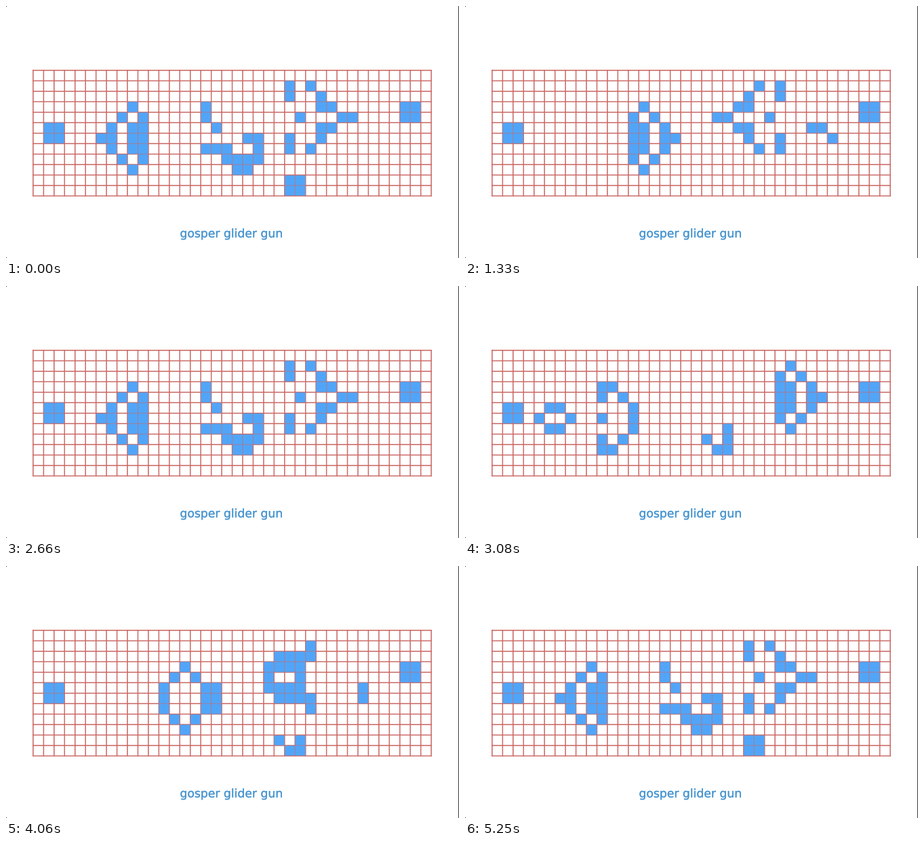
Recreate the animation shown at these times as a matplotlib script. Size 668 px wide and 372 px high, loop 5320 ms.

```python
import matplotlib.pyplot as plt
import numpy as np
from matplotlib.animation import FuncAnimation
from matplotlib.collections import LineCollection
from matplotlib.colors import ListedColormap
from matplotlib.patheffects import withStroke
from matplotlib.patches import Rectangle

W, H, DPI = 668, 372, 100
PX = 72 / DPI
COLS, ROWS = 38, 12
LEFT, TOP, CELL = 40, 95, 15.45
FRAMES, STEP_MS = 76, 70
RATE = 4 / 5  # generations per frame
WARMUP = 42   # generations before the loop begins

RED, BLUE, LABEL, EDGE = "#cb6a66", "#51a5f8", "#4b97d1", "#3c3c3c"

GUN = """
........................O...........
......................O.O...........
............OO......OO............OO
...........O...O....OO............OO
OO........O.....O...OO..............
OO........O...O.OO....O.O...........
..........O.....O.......O...........
...........O...O....................
............OO......................
""".split()


def evolve(grid):
    """One Game of Life step; everything beyond the border is dead."""
    pad = np.pad(grid, 1)
    near = sum(pad[r:r + ROWS, c:c + COLS]
               for r in range(3) for c in range(3)) - grid
    return ((near == 3) | ((near == 2) & (grid == 1))).astype(int)


def history(count):
    grid = np.zeros((ROWS, COLS), int)
    for r, line in enumerate(GUN, 1):
        for c, mark in enumerate(line, 1):
            grid[r, c] = mark == "O"
    for _ in range(WARMUP):
        grid = evolve(grid)
    states = [grid]
    while len(states) < count:
        states.append(evolve(states[-1]))
    return states


states = history(int(FRAMES * RATE) + 1)

fig = plt.figure(figsize=(W / DPI, H / DPI), dpi=DPI, facecolor="white")
ax = fig.add_axes([0, 0, 1, 1])
ax.set_xlim(0, W)
ax.set_ylim(H, 0)
ax.axis("off")

xs = LEFT + CELL * np.arange(COLS + 1)
ys = TOP + CELL * np.arange(ROWS + 1)
rules = [[(x, ys[0]), (x, ys[-1])] for x in xs]
rules += [[(xs[0], y), (xs[-1], y)] for y in ys]


def add_grid(alpha, z):
    ax.add_collection(LineCollection(rules, colors=RED, linewidths=1.35 * PX,
                                     alpha=alpha, zorder=z, snap=False,
                                     capstyle="projecting"), autolim=False)


add_grid(1, 1)
cells = ax.pcolormesh(xs, ys, states[0], vmin=0, vmax=1, zorder=2,
                      cmap=ListedColormap([(1, 1, 1, 0), BLUE]))
add_grid(0.5, 3)  # tints the seams between live cells

ax.text(333, 341.5, "gosper glider gun", color=LABEL, family="DejaVu Sans",
        size=17.2 * PX, ha="center", va="baseline",
        path_effects=[withStroke(linewidth=0.3 * PX, foreground=LABEL)])

# window border
ax.add_patch(Rectangle((W - 1, 0), 1, H, color=EDGE, lw=0))
for y in (0, H - 1):
    ax.add_patch(Rectangle((0, y), 1, 1, color=EDGE, lw=0))

ax.set_xlim(0, W)
ax.set_ylim(H, 0)


def draw(i):
    cells.set_array(states[int(i * RATE + 1e-6)])
    return [cells]


anim = FuncAnimation(fig, draw, frames=FRAMES, interval=STEP_MS,
                     repeat=True, repeat_delay=0, blit=False)
plt.show()
```
